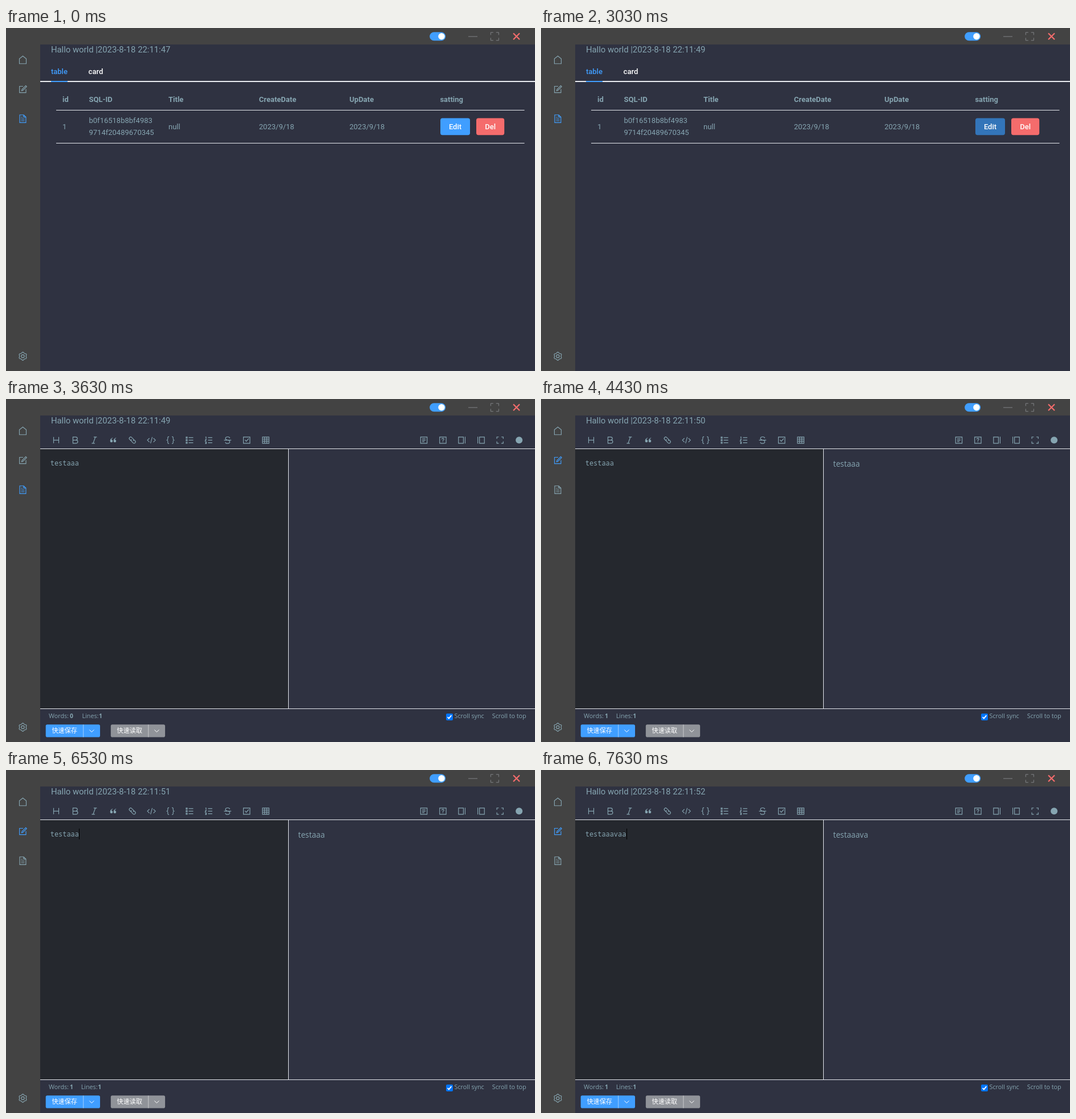
Write an HTML page that moves like this. It is 928 by 603 pixels and loops after 8000 ms.

```html
<!DOCTYPE html>
<html lang="en">
<head>
<meta charset="utf-8">
<title>Notes app</title>
<style>
  html, body { margin: 0; width: 100%; height: 100%; overflow: hidden; background: #434343; }
  svg { display: block; }
  text { font: 13px Roboto, sans-serif; fill: #86a5b1; white-space: pre; }
  .clock { font-size: 14.85px; }
  .bold { font-weight: 700; }
  .btn { font-weight: 500; fill: #fff; }
  .mid { text-anchor: middle; }
  .mono { font: 11.93px "Noto Sans Mono", monospace; }
  .preview { font: 13.7px "Open Sans", sans-serif; }
  .foot { font: 10.75px "Open Sans", sans-serif; }
  .num { font-weight: 700; font-size: 10.3px; }
  .cjk { font: 500 11.14px "Noto Sans CJK SC", "Noto Sans CJK", sans-serif; fill: #fff; }
  .icon { fill: none; stroke: #86a5b1; stroke-width: 1.15; }
  .solid { fill: #86a5b1; stroke: none; }
</style>
</head>
<body>
<svg id="stage" width="928" height="603" viewBox="0 0 928 603"></svg>
<script>
const LOOP = 8000;
const BLUE = [64, 158, 255], GREY = [134, 165, 177];

// Markup helpers
const rect = (x, y, w, h, fill, r = 0, id = '') =>
  `<rect id="${id}" x="${x}" y="${y}" width="${w}" height="${h}" rx="${r}" fill="${fill}"/>`;
const text = (x, y, str, cls = '', id = '') =>
  `<text id="${id}" x="${x}" y="${y}" class="${cls}">${str}</text>`;
const icon = (x, y, d, extra = '') =>
  `<path class="icon" transform="translate(${x} ${y})" d="${d}" ${extra}/>`;
const box = (x, y, w, h) => `M${x} ${y}h${w}v${h}h${-w}z`;
const corners = (r, n) => [[-1, -1], [1, -1], [1, 1], [-1, 1]]
  .map(([a, b]) => `M${a * r} ${b * (r - n)}V${b * r}H${a * (r - n)}`).join('');

function gear() {
  const pts = [];
  for (let i = 0; i < 48; i++) {
    const a = i * Math.PI / 24, r = 6.4 - 0.75 * Math.cos(6 * a);
    pts.push((r * Math.cos(a)).toFixed(2) + ' ' + (r * Math.sin(a)).toFixed(2));
  }
  return `M${pts.join('L')}zM2.6 0A2.6 2.6 0 1 1 -2.6 0A2.6 2.6 0 1 1 2.6 0`;
}

function frameParts() {
  return rect(0, 0, 928, 603, '#434343') + rect(60, 29, 868, 574, '#2f3241') +
    rect(743.2, 7.2, 28, 15, '#409eff', 7.5) +
    '<circle cx="764" cy="14.7" r="5.7" fill="#fff"/>' +
    icon(819, 15, 'M-8 0H8', 'style="stroke:#808387;stroke-width:1"') +
    icon(857.3, 14.8, corners(7, 4.5), 'style="stroke:#808387;stroke-width:1"') +
    icon(895.5, 14.8, 'M-5.5-5.5L5.5 5.5M5.5-5.5L-5.5 5.5', 'style="stroke:#f56c6c;stroke-width:2.2"') +
    icon(29.5, 56, 'M0-6.8L6-2V6.7H-6V-2z') +
    icon(29.5, 107.5, 'M.5-5H-5.8V6.1H5.5V0M5.2-6.2L6.8-4.6 0 2.2-2 2.8-1.4.6z', 'id="navEdit"') +
    icon(29.5, 159.5, 'M-5.4-6.8H1.5L5.4-2.9V6.8H-5.4zM1.5-6.8V-2.9H5.4M-3-2.5H-.5M-3 .5H3M-3 3.5H3', 'id="navDoc"') +
    icon(29.5, 577, gear()) +
    text(78.9, 42.8, '', 'clock', 'clock');
}

function tableView() {
  const cols = [99, 145.5, 285, 443.8, 602.5, 761.4];
  const heads = ['id', 'SQL-ID', 'Title', 'CreateDate', 'UpDate', 'satting'];
  const cells = ['1', '', 'null', '2023/9/18', '2023/9/18', ''];
  return text(78.9, 80.7, 'table', '" style="font-weight:500;fill:#409eff') +
    text(144.6, 80.7, 'card', 'btn') +
    rect(60, 93, 868, 2, '#e9ecf1') + rect(79, 93, 29, 2, '#409eff') +
    cols.map((x, i) => text(x, 130, heads[i], 'bold') + text(x, 178, cells[i])).join('') +
    text(145.5, 167, 'b0f16518b8bf4983') + text(145.5, 188.4, '9714f20489670345') +
    rect(88, 144, 821.5, 1, '#e4e7ed') + rect(88, 202, 821.5, 1, '#e4e7ed') +
    rect(762, 158.5, 52, 29.7, '#409eff', 3.7, 'editBtn') + text(788, 178, 'Edit', 'btn mid') +
    rect(825, 158.5, 49.2, 29.7, '#f56c6c', 3.7) + text(849.6, 178, 'Del', 'btn mid');
}

function toolbar() {
  const step = 33.42, y = 72.3;
  const frame = box(-5.7, -5.5, 11.4, 11);
  const left = [
    'M-4.5-5.5V5.5M4.5-5.5V5.5M-4.5 0H4.5',
    'M-4-5.5H1a2.7 2.7 0 0 1 0 5.4H-4zM-4 0H1.7a2.75 2.75 0 0 1 0 5.5H-4z',
    'M-1-5.5H4.5M-4.5 5.5H1M2-5.5L-2 5.5',
    '', '',
    'M-3.5-3.5L-7 0l3.5 3.5M3.5-3.5L7 0 3.5 3.5M1.5-5.5l-3 11',
    'M-2.5-6h-.8q-1.4 0-1.4 1.5v2.5q0 1.5-1.4 2 1.4.5 1.4 2v2.5q0 1.5 1.4 1.5h.8' +
      'M2.5-6h.8q1.4 0 1.4 1.5v2.5q0 1.5 1.4 2-1.4.5-1.4 2v2.5q0 1.5-1.4 1.5h-.8',
    [-4.5, 0, 4.5].map(v => `M-1.5 ${v}H6.5` + box(-6, v - 1, 2, 2)).join(''),
    'M-1-4.5H6.5M-1 0H6.5M-1 4.5H6.5M-5.6-5.5h1.2v3M-6-1.2h2L-6 1.4h2M-6 3.2h2v2.8h-2M-5.5 4.6h1.5',
    'M3.8-3.4Q3.4-5.8 0-5.8T-3.8-3.1Q-3.8-.8 0 0q3.8.8 3.8 3.1T0 5.8-3.8 3.4M-6.3 0H6.3',
    frame + 'M-3-.5L-.7 2 3.6-2.8',
    frame + 'M-5.7-1.8H5.7M-5.7 1.8H5.7M-1.9-5.5V5.5M1.9-5.5V5.5'
  ];
  const right = [
    frame + 'M-3-2.6H3M-3 0H3M-3 2.6H1',
    frame + 'M-1.8-1.4Q-1.8-3.2 0-3.2T1.8-1.5Q1.8-.5 0 .4V1.4M0 2.3V3.5',
    box(-6, -5.5, 8.6, 11) + 'M5.6-6V6',
    box(-2.6, -5.5, 8.6, 11) + 'M-5.6-6V6',
    corners(5.6, 3.4)
  ];
  const quote = 'C-4-3.5-5.4-1.5-5.4 1.6a2.3 2.3 0 1 0 2.3-2.3C-3-2-2.2-3-.8-3.5z';
  const at = (x0, i) => x0 + i * step;
  return left.map((d, i) => icon(at(88, i), y, d)).join('') +
    right.map((d, i) => icon(at(733, i), y, d)).join('') +
    [0, 6].map(dx => `<path class="solid" transform="translate(${at(88, 3) + dx - .2} ${y})" d="M-1-4.4${quote}"/>`).join('') +
    `<path class="icon" transform="translate(${at(88, 4)} ${y}) rotate(45)" d="` +
      'M-1.5 2.5H-4.2a2.5 2.5 0 0 1 0-5H-.5A2.5 2.5 0 0 1 2 0M1.5-2.5H4.2a2.5 2.5 0 0 1 0 5H.5A2.5 2.5 0 0 1-2 0"/>' +
    `<circle class="solid" cx="${at(733, 5)}" cy="${y}" r="6"/>`;
}

function splitButton(x, label, fill) {
  return rect(x, 572.3, 95.3, 22.3, fill, 2.8) +
    rect(x + 65.5, 572.3, 1, 22.3, 'rgba(255,255,255,.5)') +
    text(x + 10.7, 587.4, label, 'cjk') +
    icon(x + 80.6, 583.5, 'M-4-2L0 2 4-2', 'style="stroke:#fff;stroke-width:1"');
}

function editorView() {
  return toolbar() +
    rect(60, 88, 435, 456, '#25282e') +
    rect(60, 87, 868, 1, '#e4e7ed') + rect(60, 544, 868, 1, '#e4e7ed') + rect(495, 88, 1, 456, '#e4e7ed') +
    text(77.8, 117, '', 'mono', 'typed') + rect(128, 103, 1, 19, '#000', 0, 'caret') +
    text(512.6, 119, '', 'preview', 'preview') +
    text(75, 561.3, 'Words:', 'foot') + text(112, 561.3, '', 'foot num', 'words') +
    text(133.5, 561.3, 'Lines:', 'foot', 'lines') + text(163, 561.3, '1', 'foot num', 'lineNum') +
    rect(772, 553, 12, 12, '#0075ff', 2) +
    icon(778, 559, 'M-3.4.2L-1.1 2.6 3.4-2.8', 'style="stroke:#fff;stroke-width:1.8"') +
    text(786.5, 561.3, 'Scroll sync', 'foot') + text(852.8, 561.3, 'Scroll to top', 'foot') +
    splitButton(69.7, '快速保存', '#409eff') + splitButton(183.8, '快速读取', '#909399');
}

document.getElementById('stage').innerHTML = frameParts() +
  `<g id="tableView">${tableView()}</g><g id="editorView">${editorView()}</g>`;
const el = id => document.getElementById(id);

// Each track is a list of [start ms, value]
const tracks = {
  second: [[0, 47], [1430, 48], [3030, 49], [4430, 50], [6030, 51], [7430, 52]],
  edit: [[0, '#409eff'], [1530, '#3a8adc'], [1630, '#3375b9'], [3530, '#428bd6']],
  editor: [[0, false], [3630, true]],
  nav: [[0, 0], [3730, 0.4], [3830, 0.8], [3930, 1]],
  typed: [[0, 'testaaa'], [6730, 'testaaav'], [7130, 'testaaava'], [7630, 'testaaavaa']],
  preview: [[0, ''], [4130, 'testaaa'], [7530, 'testaaava']],
  caret: [[0, false], [4930, true], [5730, false], [6530, true]]
};
const at = (name, t) => tracks[name].reduce((v, [start, value]) => t >= start ? value : v, null);
const mix = (a, b, k) => `rgb(${a.map((v, i) => Math.round(v + (b[i] - v) * k))})`;
const show = (id, on) => { el(id).style.display = on ? '' : 'none'; };
const put = (id, str) => { if (el(id).textContent !== str) el(id).textContent = str; };

function draw(t) {
  const editor = at('editor', t), typed = at('typed', t), preview = at('preview', t), nav = at('nav', t);
  put('clock', 'Hallo world |2023-8-18 22:11:' + at('second', t));
  show('tableView', !editor);
  show('editorView', editor);
  el('editBtn').setAttribute('fill', at('edit', t));
  el('navEdit').style.stroke = mix(GREY, BLUE, nav);
  el('navDoc').style.stroke = mix(BLUE, GREY, nav);
  put('typed', typed);
  put('preview', preview);
  put('words', preview ? '1' : '0');
  el('lines').setAttribute('x', preview ? 131.7 : 133.5);
  el('lineNum').setAttribute('x', preview ? 161.2 : 163);
  show('caret', at('caret', t));
  el('caret').setAttribute('x', Math.round(128.1 + 7.16 * (typed.length - 7)));
}

const start = performance.now();
function tick() {
  draw((performance.now() - start) % LOOP);
  requestAnimationFrame(tick);
}
tick();
</script>
</body>
</html>
```
